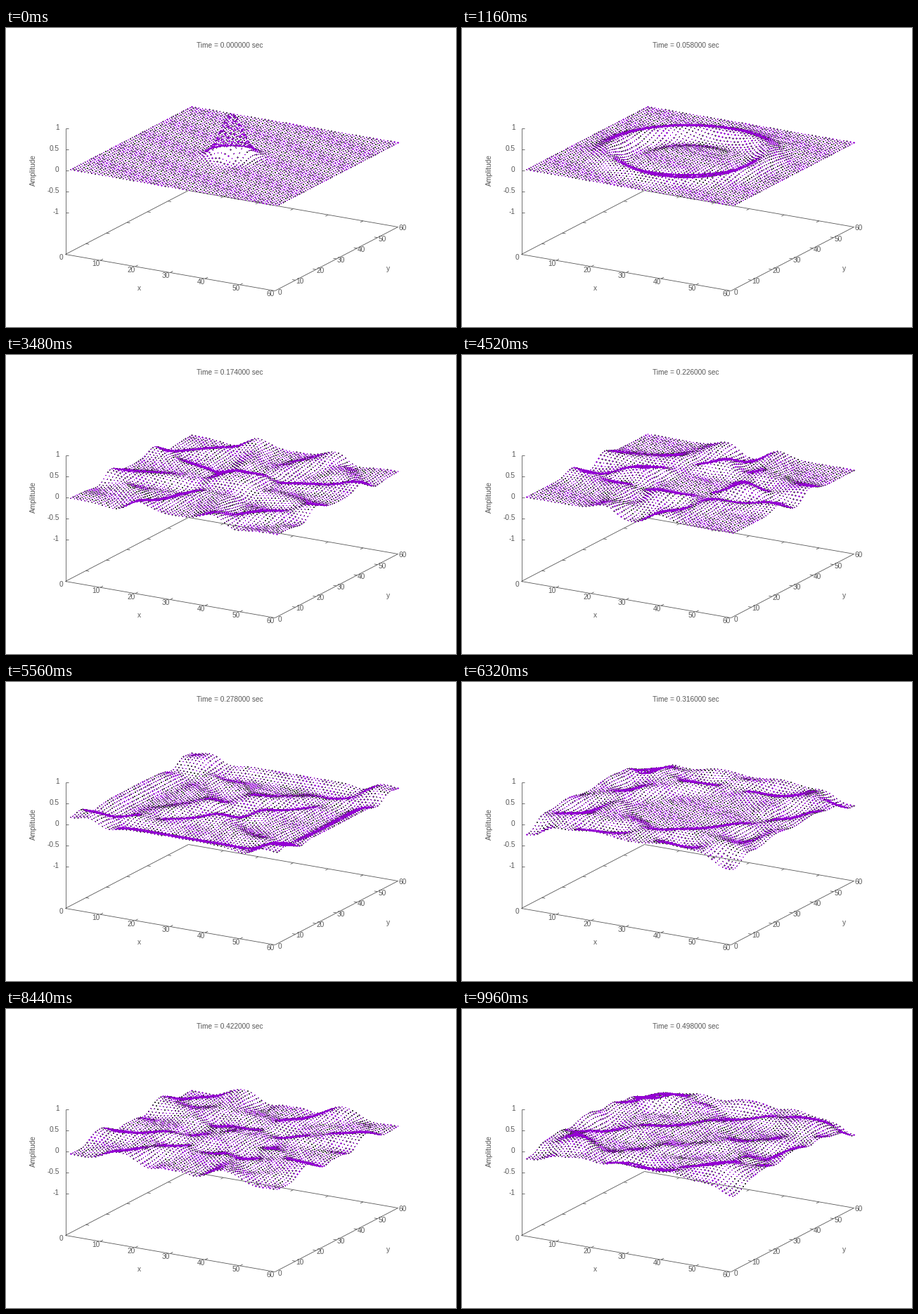
Animation of 640x426 px, one loop 10 s. Source, as a matplotlib script:

```python
import numpy as np
import matplotlib.pyplot as plt
from matplotlib.animation import FuncAnimation

W, H, DPI = 640, 426, 64
FRAMES, STEP_MS, DT = 250, 40, 0.002
N = 60
COURANT2 = 0.4
VIOLET = (0x94, 0x00, 0xD3, 255)
DARK = (0x40, 0x40, 0x40, 255)
LINE_INK, TEXT_INK = "#505050", "#585858"

# Stage position of the base corner and the axis vectors per unit
ORIGIN = np.array([84.0, 322.0])
X_UNIT = np.array([298, 52]) / 60
Y_UNIT = np.array([175, -91]) / 60
Z_UNIT, Z_BASE = 60, -2


def project(x, y, z=Z_BASE):
    px = ORIGIN[0] + x * X_UNIT[0] + y * Y_UNIT[0]
    py = ORIGIN[1] + x * X_UNIT[1] + y * Y_UNIT[1] - (z - Z_BASE) * Z_UNIT
    return px, py


def simulate():
    """Heights of a membrane with mirror edges released from a central bump."""
    i = np.arange(1, N + 1)
    r2 = (i[:, None] - 30) ** 2 + (i[None, :] - 30) ** 2
    now = np.exp(-r2 / 16)
    before = now.copy()
    states = []
    for _ in range(FRAMES):
        states.append(now)
        p = np.pad(now, 1, mode="reflect")
        lap = p[2:, 1:-1] + p[:-2, 1:-1] + p[1:-1, 2:] + p[1:-1, :-2] - 4 * now
        before, now = now, 2 * now - before + COURANT2 * lap
    return states


GX, GY = np.meshgrid(np.arange(1, N + 1), np.arange(1, N + 1), indexing="ij")
STATES = simulate()


def surface_image(heights):
    """Small plus marks: thin coverage is dark, strong coverage is violet."""
    px, py = project(GX, GY, heights)
    px, py = px.ravel(), py.ravel()
    x0, y0 = np.floor(px).astype(int), np.floor(py).astype(int)
    fx, fy = px - x0, py - y0
    cover = np.zeros(W * H)
    for dx, wx in ((0, 1 - fx), (1, fx)):
        for dy, wy in ((0, 1 - fy), (1, fy)):
            cell = (y0 + dy) * W + x0 + dx
            cover += np.bincount(cell, wx * wy, W * H)
    cover = cover.reshape(H, W)
    plus = cover.copy()
    for axis in (0, 1):
        for shift in (-1, 1):
            plus += np.roll(cover, shift, axis)
    image = np.zeros((H, W, 4), np.uint8)
    image[plus > 0.62] = DARK
    image[plus > 0.82] = VIOLET
    return image


fig = plt.figure(figsize=(W / DPI, H / DPI), dpi=DPI, facecolor="white")
ax = fig.add_axes([0, 0, 1, 1])
ax.set_axis_off()


def line(start, end):
    ax.plot(*zip(start, end), color=LINE_INK, lw=0.8 * 72 / DPI,
            solid_capstyle="butt", zorder=1)


def label(x, y, text, **kw):
    style = dict(ha="center", va="center", color=TEXT_INK,
                 family="Liberation Sans", fontsize=10.1 * 72 / DPI)
    return ax.text(x, y, text, **{**style, **kw})


def draw_axes():
    corners = [project(*c) for c in ((0, 0), (N, 0), (N, N), (0, N))]
    for a, b in zip(corners, corners[1:] + corners[:1]):
        line(a, b)
    line(project(0, 0), project(0, 0, 1))

    for v in range(0, N + 1, 10):
        if 0 < v < N:
            line(project(v, 0), project(v, 1.3))
            line(project(v, N), project(v, N - 1.3))
            line(project(0, v), project(0.9, v))
            line(project(N, v), project(N - 0.9, v))
        x, y = project(v, 0)
        label(x - 6, y + 5, str(v))
        x, y = project(N, v)
        label(x + 6.5, y + 2, str(v))

    for z in (-1, -0.5, 0, 0.5, 1):
        x, y = project(0, 0, z)
        line((x, y), (x + 4, y))
        label(75, y - 0.7, f"{z:g}", ha="right")

    label(189, 371, "x")
    label(543, 342, "y")
    label(38.5, 202, "Amplitude", rotation=90)


draw_axes()
title = label(317.7, 24, "")
surface = ax.imshow(surface_image(STATES[0]), interpolation="nearest",
                    extent=(-0.5, W - 0.5, H - 0.5, -0.5), aspect="auto",
                    zorder=2)
ax.set_xlim(-0.5, W - 0.5)
ax.set_ylim(H - 0.5, -0.5)


def update(n):
    title.set_text(f"Time = {n * DT:.6f} sec")
    surface.set_data(surface_image(STATES[n]))
    return title, surface


anim = FuncAnimation(fig, update, frames=FRAMES, interval=STEP_MS,
                     repeat=True, repeat_delay=0)
plt.show()
```
